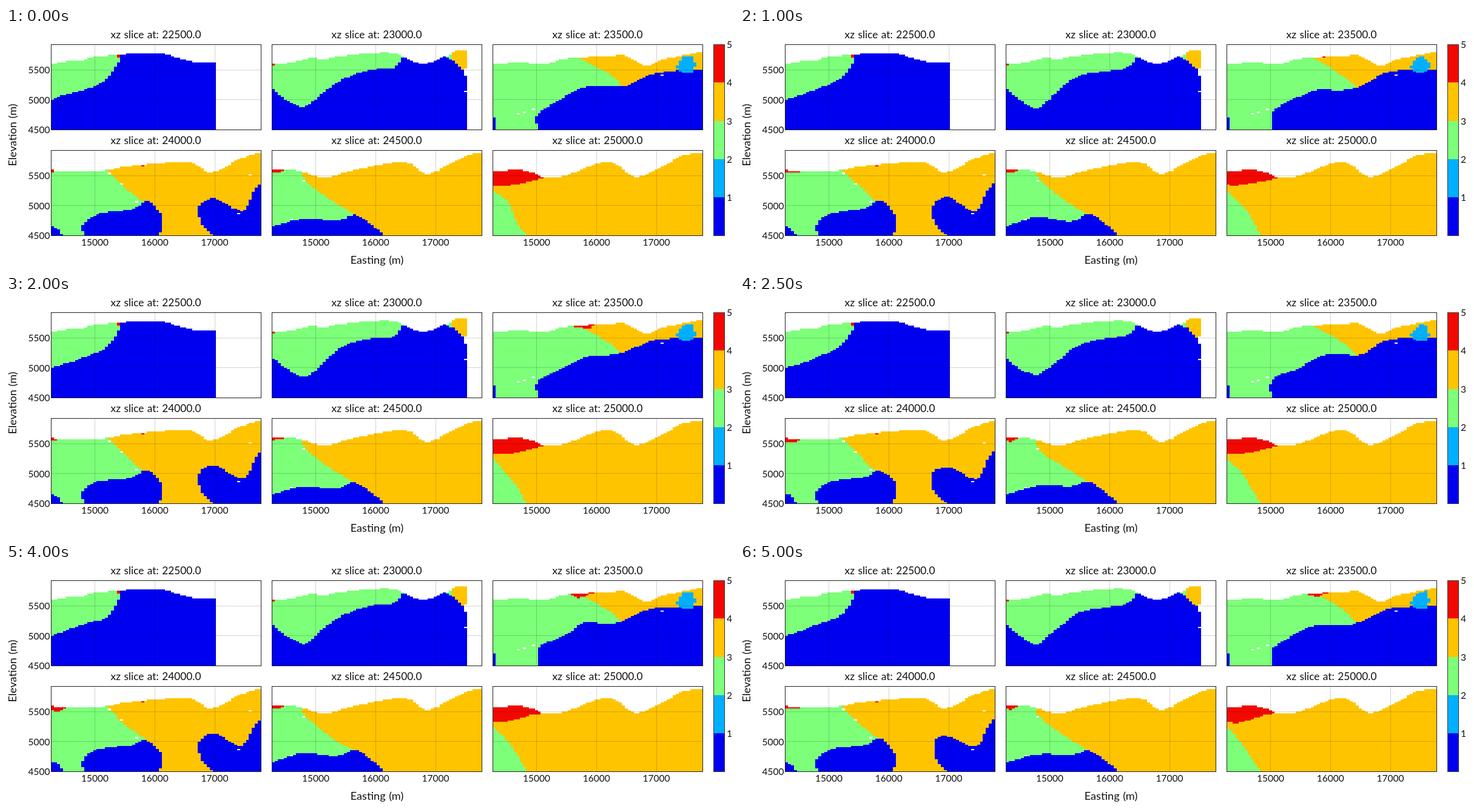
An HTML page with a canvas that plays this animation: 1200 px wide and 397 px high, repeating every 5500 ms.

```html
<!DOCTYPE html>
<html lang="en">
<head>
<meta charset="utf-8">
<title>Cross sections</title>
<style>
html, body { margin: 0; width: 100%; height: 100%; overflow: hidden; background: #fff; }
canvas { display: block; }
</style>
</head>
<body>
<canvas id="stage" width="1200" height="397"></canvas>
<script>
const ctx = document.getElementById('stage').getContext('2d');
const BLUE = '#0000f0', CYAN = '#00b0ff', GREEN = '#7dff7a', ORANGE = '#ffc400', RED = '#f10800', WHITE = '#fff';
const CELL_W = 4.94, CELL_H = 2.47, COLS = 70, ROWS = 57;
const STEP = 500;
const MODELS = [0, 1, 2, 3, 4, 5, 6, 7, 8, 7, 9];

// Ways to close an open boundary line into an area.
const CLOSE = {
  up: (a, b) => [[b[0], 0], [a[0], 0]],
  down: (a, b) => [[b[0], 400], [a[0], 400]],
  left: (a, b) => [[b[0], 400], [0, 400], [0, 0], [a[0], 0]],
  right: (a, b) => [[b[0], 400], [2000, 400], [2000, 0], [a[0], 0]],
  loop: () => []
};

// A boundary through a few key points; sway is how far it moves between models.
let count = 0;
const shape = (color, close, keys, sway = 0) => ({
  color, sway, id: ++count, close: CLOSE[close],
  keys: keys.split(' ').map(p => p.split(',').map(Number))
});
const gap = (x, y, h = CELL_H) =>
  shape(WHITE, 'loop', `${x},${y - h / 2} ${x + 5},${y - h / 2} ${x + 5},${y + h / 2} ${x},${y + h / 2}`);

// The first shape of each section is its ground; later shapes lie on top.
const sections = [
  [
    shape(BLUE, 'down', '74,60 104,55 125,54 145,48 215,42 255,42 288,51 325,58 346.5,53'),
    shape(GREEN, 'up', '74,119 100,110 135,98 164,87 181,66 189,49', 3),
    shape(RED, 'up', '183,50 188,50'),
    gap(341.5, 55.5)
  ], [
    shape(BLUE, 'down', '438,60 454,60 480,55 505,50 522,53 550,47 600,42 640,42 684,59 725,47 742,38 759.5,37'),
    shape(GREEN, 'up', '438,100 460,118 488,132 505,124 525,106 560,80 605,70 638,66 654,48', 3),
    shape(GREEN, 'up', '724,49 737,53'),
    shape(ORANGE, 'up', '735,50 740,57 750,67 760,78', 2),
    shape(RED, 'up', '438,61 443,61'),
    gap(755, 73, 12), gap(754.5, 105)
  ], [
    shape(GREEN, 'down', '802,60 850,57 885,60 925,51 1000,46 1020,46 1057,62 1080,53 1135,42 1149,38'),
    shape(ORANGE, 'right', '945,50 968,61 1000,81 1015,97', 3),
    shape(BLUE, 'down', '878,168 874,152 880,137 920,117 955,100 995,99 1025,93 1065,75 1110,70 1149,68', 4),
    shape(BLUE, 'loop', '802,149 807,149 808,168 802,168'),
    shape(CYAN, 'loop', '1104,64 1118,47 1130,47 1138,62 1130,74 1112,73', 2),
    shape(RED, 'up', '930,49 952,49 972,47', 8),
    shape(RED, 'up', '802,60 807,60'),
    gap(841.5, 142), gap(851.5, 140), gap(866.5, 135), gap(1079, 77)
  ], [
    shape(ORANGE, 'down', '74,235 110,238 160,236 200,229 300,222 335,239 365,228 385,216 421,206'),
    shape(GREEN, 'left', '168,235 192,260 214,279 234,292', 3),
    shape(BLUE, 'down', '130,344 125,326 150,306 205,299 232,288 255,312 257,332 250,344', 3),
    shape(BLUE, 'down', '343,344 323,325 318,295 343,282 388,304 408,273 421,253', 3),
    shape(BLUE, 'down', '74,327 85,332 94,344', 2),
    shape(RED, 'up', '74,240 86,240 98,238', 4),
    shape(RED, 'up', '222,230 228,230'),
    gap(168, 240), gap(188, 258), gap(212.5, 287), gap(401, 243), gap(381, 307)
  ], [
    shape(ORANGE, 'down', '438,235 475,235 525,247 570,236 655,222 695,241 735,223 760,211 785,206'),
    shape(GREEN, 'left', '487,238 498,257 540,287 578,311', 3),
    shape(BLUE, 'down', '438,329 490,314 545,317 580,310 626,344', 3),
    shape(RED, 'up', '438,239 446,239 456,237', 3),
    gap(468, 317), gap(487.5, 253)
  ], [
    shape(ORANGE, 'down', '802,238 850,235 890,247 925,243 993,221 1035,246 1080,231 1112,212 1149,206'),
    shape(GREEN, 'left', '802,269 825,289 840,315 858,344', 4),
    shape(RED, 'up', '802,260 825,262 865,252 892,247', 3)
  ]
];

// Seeded number from -1 to 1.
function noise(seed) {
  const v = Math.sin(seed * 12.9898) * 43758.5453;
  return (v - Math.floor(v)) * 2 - 1;
}

// Catmull-Rom curve through the points.
function smooth(pts, parts = 6) {
  const last = pts.length - 1, out = [];
  for (let i = 0; i < last; i++) {
    const [a, b, c, d] = [pts[Math.max(i - 1, 0)], pts[i], pts[i + 1], pts[Math.min(i + 2, last)]];
    for (let s = 0; s < parts; s++) {
      const t = s / parts;
      out.push([0, 1].map(k => b[k] + t / 2 * (c[k] - a[k]
        + t * (2 * a[k] - 5 * b[k] + 4 * c[k] - d[k] + t * (3 * (b[k] - c[k]) + d[k] - a[k])))));
    }
  }
  return [...out, pts[last]];
}

// Both ends stay fixed; the middle sways most.
function outline({ keys, sway, id, close }, model) {
  const last = keys.length - 1;
  const moved = keys.map((p, i) => p.map((v, k) =>
    v + sway * Math.sin(Math.PI * i / last) * noise(model * 97 + id * 13 + i * 2 + k)));
  const line = close === CLOSE.loop ? moved : smooth(moved);
  return line.concat(close(line[0], line[line.length - 1]));
}

function inside(poly, x, y) {
  let hit = false;
  for (let i = 0, j = poly.length - 1; i < poly.length; j = i++) {
    const [ax, ay] = poly[i], [bx, by] = poly[j];
    if (ay > y !== by > y && x < (bx - ax) * (y - ay) / (by - ay) + ax) hit = !hit;
  }
  return hit;
}

function text(s, x, y, size, align = 'center') {
  ctx.font = `${size}px Lato, Carlito, sans-serif`;
  ctx.textAlign = align;
  ctx.fillStyle = '#111';
  ctx.fillText(s, x, y);
}

function drawCells(shapes, x, bottom, model) {
  const areas = shapes.map(s => ({ color: s.color, poly: outline(s, model) }));
  const ground = areas[0].poly;
  for (let c = 0; c < COLS; c++) {
    const left = Math.round(x + c * CELL_W), right = Math.round(x + (c + 1) * CELL_W);
    const cx = x + (c + 0.5) * CELL_W;
    for (let r = 0; r < ROWS; r++) {
      const cy = bottom - (r + 0.5) * CELL_H;
      if (!inside(ground, cx, cy)) continue;
      const top = Math.round(cy - CELL_H / 2), low = Math.round(cy + CELL_H / 2);
      ctx.fillStyle = areas.findLast(a => inside(a.poly, cx, cy)).color;
      ctx.fillRect(left, top, right - left, low - top);
    }
  }
}

function drawAxes(left, bottom, title) {
  const top = bottom - 141;
  ctx.fillStyle = 'rgba(0,0,0,.17)';
  for (const dx of [72, 171, 270]) ctx.fillRect(left + dx, top, 1, 141);
  for (const dy of [50, 99]) ctx.fillRect(left, bottom - dy, 346, 1);
  ctx.strokeStyle = '#222';
  ctx.lineWidth = 1;
  ctx.strokeRect(left + 0.5, top + 0.5, 346, 141);
  text('xz slice at: ' + title, left + 173, top - 10, 17.3);
  for (let i = 0; i < 3; i++) {
    if (left < 100) text(4500 + i * 500, 72.5, bottom + 6 - i * 49.5, 15.5, 'right');
    if (bottom > 300) text(15000 + i * 1000, left + 72.5 + i * 98.8, 360, 15.5);
  }
}

function drawScale() {
  [RED, ORANGE, GREEN, CYAN, BLUE].forEach((color, i) => {
    const y = 27 + i * 63.3;
    ctx.fillStyle = color;
    ctx.fillRect(1167, Math.round(y), 18, 64);
    text(5 - i, 1188, y + 6, 15.5, 'left');
  });
  ctx.strokeStyle = '#333';
  ctx.strokeRect(1166.5, 27.5, 18, 316);
}

function draw(model) {
  ctx.fillStyle = WHITE;
  ctx.fillRect(0, 0, 1200, 397);
  ctx.wordSpacing = '1px';
  sections.forEach((shapes, i) => {
    const left = 74 + i % 3 * 364, bottom = i < 3 ? 168 : 343;
    drawCells(shapes, left + 0.4, bottom, model);
    drawAxes(left, bottom, (22500 + i * 500).toFixed(1));
  });
  drawScale();
  text('Easting (m)', 611.5, 390, 18.1);
  ctx.save();
  ctx.translate(17, 177);
  ctx.rotate(-Math.PI / 2);
  text('Elevation (m)', 0, 0, 18.1);
  ctx.restore();
}

let shown = -1;
function tick() {
  const step = Math.floor(performance.now() / STEP) % MODELS.length;
  if (step !== shown) draw(MODELS[shown = step]);
  requestAnimationFrame(tick);
}
tick();
</script>
</body>
</html>
```
